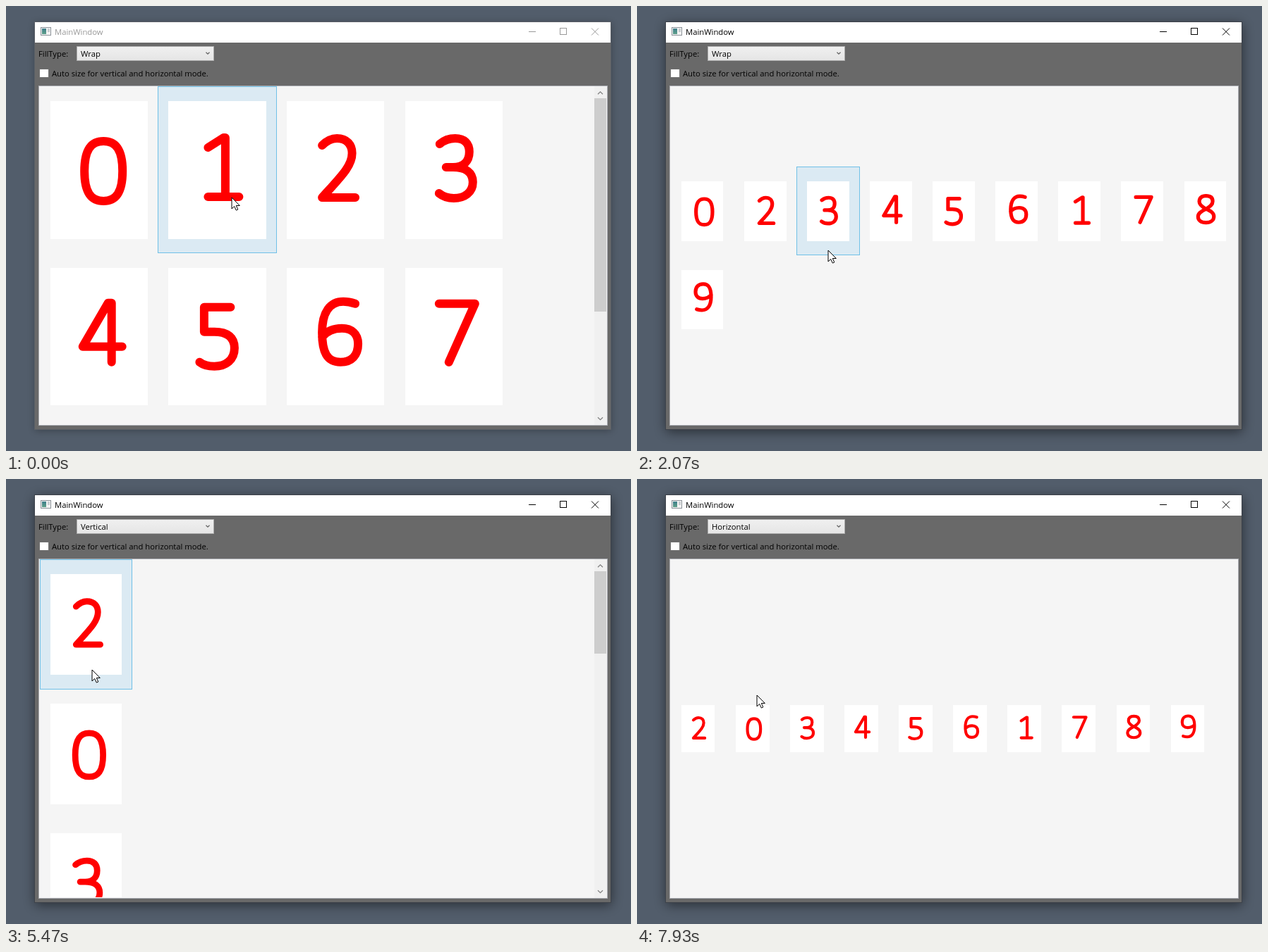
Animation of 886x632 px, one loop 8000 ms. Source, as an HTML page with a canvas:

```html
<!DOCTYPE html>
<html lang="en">
<head>
<meta charset="utf-8">
<title>Reorderable card list</title>
<style>
html, body { margin: 0; width: 100%; height: 100%; overflow: hidden; background: #525d6b; }
canvas { display: block; }
</style>
</head>
<body>
<canvas id="stage" width="886" height="632"></canvas>
<script>
const ctx = document.getElementById('stage').getContext('2d');
const LOOP = 8000, STEP = 200 / 3, FULL = 138.3;
const MODES = ['Horizontal', 'Vertical', 'Wrap'];

// Centre lines of the digits on a full-size card
const DIGITS = [
  'M75.5 57C94 57 102.5 70 102.5 99.5C102.5 129 94 142 75.5 142C57 142 48.5 129 48.5 99.5C48.5 70 57 57 75.5 57Z',
  'M56 66L78 52H80.5V136M56 136H100',
  'M50 63C58 55 66 53 71 53C85 53 92.5 62 92.5 74C92.5 92 78 106 50 137H97',
  'M49 61C57 54 65 53 71 53C84 53 91 60 91 72C91 86 82 94 68 94H58M68 94C86 94 96 102 96 115C96 130 84 138 69 138C60 138 53 135 48 131',
  'M87 134V50H82L46 112H102',
  'M88 56H50.5V91H65C84 91 93.5 99 93.5 114C93.5 131 81 140 65 140C56 140 49 138 44 134',
  'M97 51C91 49 86 48 80 48C62 48 50 62 50 92C50 120 57 134 76 134C92 134 101 124 101 108C101 94 92 86 78 86C66 86 56 91 50 98',
  'M48 51H99L62 134',
  'M72 90C55 81 50 75 50 66C50 54 58 47 72 47C87 47 94 54 94 65C94 76 86 82 72 90C54 99 46 105 46 115C46 128 56 135 72 135C88 135 98 127 98 115C98 104 90 98 72 90Z',
  'M51 129C57 131 62 132 68 132C86 132 98 118 98 88C98 60 91 46 72 46C56 46 47 56 47 72C47 86 56 94 70 94C82 94 92 89 98 82'
].map(d => new Path2D(d));
const ARROW = new Path2D('M.5 .5V16.5L4.2 13L6.8 18.6L9.3 17.5L6.8 12H11.8Z');

// [time, x, y]
const POINTER = [
  [0, 320, 272], [60, 320, 272], [200, 288, 254], [870, 462, 464], [930, 462, 464],
  [1070, 465, 470], [1270, 464, 466], [1600, 271, 357], [1870, 271, 357], [2000, 271, 347],
  [2270, 271, 347], [2400, 271, 357], [2530, 271, 357], [2730, 252, 96], [2800, 252, 96],
  [3000, 246, 74], [3130, 243, 72], [3270, 236, 73], [3600, 180, 108], [3730, 180, 108],
  [4470, 121, 425], [4730, 121, 425], [5200, 122, 268], [5400, 122, 268], [5470, 122, 271],
  [5940, 122, 271], [6270, 140, 146], [6600, 172, 70], [6800, 172, 70], [7130, 163, 117],
  [7200, 163, 117], [7470, 165, 92], [7670, 165, 92], [7930, 170, 307]
];
// [time, card width]
const ZOOM = [
  [0, FULL], [1270, FULL], [1730, 68], [2070, 59.7], [2270, 59.7], [2530, 101.1],
  [5470, 101.1], [6070, 47.7]
];
const DRAGS = [
  { item: 1, from: 200, to: 1200, grab: [58, 119], end: 6 },
  { item: 2, from: 4730, to: 5200, grab: [58, 106], end: 0 }
];
const POPUPS = [[3070, 3800], [6670, 7730]];

const linear = k => k;
const smooth = k => k * k * (3 - 2 * k);

function track(keys, t, ease) {
  let i = keys.findIndex(k => k[0] > t);
  if (i < 0) return keys[keys.length - 1].slice(1);
  i = Math.max(i, 1);
  const a = keys[i - 1], b = keys[i];
  const k = ease(Math.max(0, (t - a[0]) / (b[0] - a[0])));
  return a.slice(1).map((v, j) => v + (b[j + 1] - v) * k);
}

function layout(mode, w) {
  const h = w * Math.SQRT2, cw = w + 29.4, ch = h + 41.2;
  let cols = mode === 0 ? 10 : mode === 1 ? 1 : Math.min(10, Math.floor(805 / cw));
  const scroll = Math.ceil(10 / cols) * ch > 482;
  if (mode === 2 && scroll) cols = Math.min(cols, Math.floor(787 / cw));
  const total = Math.ceil(10 / cols) * ch;
  const top = scroll ? 114.4 : 354.4 - total / 2;
  return {
    w, h, cw, ch, scroll, total,
    cell: i => [48 + (i % cols) * cw, top + Math.floor(i / cols) * ch],
    slot(x, y) {
      const c = Math.floor((x - 48) / cw), r = Math.floor((y - top) / ch);
      const i = r * cols + c;
      return c < 0 || c >= cols || r < 0 || i > 9 || y < 114 || y > 594 ? -1 : i;
    }
  };
}

function rect(x, y, w, h, fill, line) {
  ctx.fillStyle = fill;
  ctx.fillRect(x, y, w, h);
  if (line) {
    ctx.strokeStyle = line;
    ctx.lineWidth = 1;
    ctx.strokeRect(x + .5, y + .5, w - 1, h - 1);
  }
}

function text(s, x, y, color = '#000') {
  ctx.fillStyle = color;
  ctx.font = '11.25px "Open Sans", "Noto Sans", sans-serif';
  ctx.fillText(s, x, y);
}

function line(points, color, width = 1) {
  ctx.beginPath();
  points.forEach(p => ctx.lineTo(...p));
  ctx.strokeStyle = color;
  ctx.lineWidth = width;
  ctx.stroke();
}

function chevron(x, y, r, dir, color) {
  line([[x - r, y - dir * r / 2], [x, y + dir * r / 2], [x + r, y - dir * r / 2]], color, 1.2);
}

function gradient(y, h, a, b) {
  const g = ctx.createLinearGradient(0, y, 0, y + h);
  g.addColorStop(0, a);
  g.addColorStop(1, b);
  return g;
}

function shadow(color, blur, dx, dy) {
  ctx.shadowColor = color;
  ctx.shadowBlur = blur;
  ctx.shadowOffsetX = dx;
  ctx.shadowOffsetY = dy;
}

function card(digit, x, y, w, h) {
  const l = Math.round(x), t = Math.round(y);
  rect(l, t, Math.round(x + w) - l, Math.round(y + h) - t, '#fff');
  ctx.save();
  ctx.translate(x, y);
  ctx.scale(w / FULL, w / FULL);
  ctx.lineWidth = 12;
  ctx.lineCap = ctx.lineJoin = 'round';
  ctx.strokeStyle = '#f00';
  ctx.stroke(DIGITS[digit]);
  ctx.restore();
}

function drawWindow(active) {
  rect(0, 0, 886, 632, '#525d6b');
  ctx.save();
  shadow(active ? 'rgba(0,0,0,.5)' : 'rgba(0,0,0,.3)', active ? 16 : 10, 0, active ? 4 : 2);
  rect(41, 22, 817, 579, '#696969');
  ctx.restore();
  rect(40, 22, 818, 580, '#696969', active ? '#3d424a' : '#5b6067');
  rect(41, 23, 816, 29, '#fff');

  rect(49, 30, 15, 12, '#f4f4f4', '#8b9299');
  rect(51, 32, 6, 8, gradient(32, 8, '#3f7f8c', '#5fa08a'));
  rect(59, 32, 3, 5, '#c9ced2');
  const ink = active ? '#000' : '#999';
  text('MainWindow', 69, 41, ink);
  line([[741, 36.5], [751, 36.5]], ink);
  ctx.strokeRect(785.5, 31.5, 9, 9);
  line([[830, 31.5], [840, 41.5]], ink);
  line([[840, 31.5], [830, 41.5]], ink);
}

function drawToolbar(mode, [x, y], open) {
  const overCombo = x > 100 && x < 295 && y > 57 && y < 78;
  const overCheck = !open && x > 47 && x < 287 && y > 87 && y < 105;
  text('FillType:', 46, 72);
  rect(100, 57, 195, 21,
    overCombo ? gradient(57, 21, '#ecf4fc', '#dcecfc') : gradient(57, 21, '#f0f0f0', '#e5e5e5'),
    overCombo ? '#7eb4ea' : '#acacac');
  text(MODES[mode], 106, 72);
  chevron(286, 67, 2.5, 1, overCombo ? '#000' : '#606060');
  rect(47, 89, 14, 13, overCheck ? '#f3f9ff' : '#fff', overCheck ? '#5593ff' : '#707070');
  text('Auto size for vertical and horizontal mode.', 65, 100);
}

function drawScrollbar(total) {
  rect(834, 114, 18, 481, '#f0f0f0');
  rect(834, 131, 17, Math.round(481 / total * 448), '#cdcdcd');
  chevron(842.5, 123.5, 3.5, -1, '#808080');
  chevron(842.5, 586, 3.5, 1, '#808080');
}

function drawList(lay, order, hover, drag, [px, py]) {
  rect(46, 113, 807, 483, '#f5f5f5', '#abadb3');
  ctx.save();
  ctx.beginPath();
  ctx.rect(47, 114, 805, 480);
  ctx.clip();
  order.forEach((digit, i) => {
    if (drag && digit === drag.item) return;
    const [x, y] = lay.cell(i);
    if (i === hover) {
      const l = Math.floor(x), t = Math.floor(y);
      rect(l, t, Math.ceil(x + lay.cw) - l, Math.round(y + lay.ch) - t, '#dbeaf3', '#70c0e7');
    }
    card(digit, x + 14.7, y + 20.6, lay.w, lay.h);
  });
  if (drag) card(drag.item, px - drag.grab[0], py - drag.grab[1], lay.w, lay.h);
  ctx.restore();
  if (lay.scroll) drawScrollbar(lay.total);
}

function drawPopup(k, mode, [x, y]) {
  const shown = Math.round(60 * k);
  if (!shown) return;
  const over = y > 79 && y < 138 && x > 100 && x < 295;
  const row = over ? Math.min(2, Math.floor((y - 79.5) / 19.5)) : mode;
  ctx.save();
  shadow('rgba(0,0,0,.55)', 4, 3, 3);
  rect(100, 79, 196, shown, '#fff');
  ctx.restore();
  ctx.save();
  ctx.beginPath();
  ctx.rect(100, 79, 196, shown);
  ctx.clip();
  ctx.translate(0, shown - 60);
  rect(100, 79, 196, 60, '#fff', '#646464');
  rect(101, Math.floor(80 + row * 19.4), 194, 19, '#d1e8f9', '#66a7d8');
  MODES.forEach((m, i) => text(m, 106, 94 + Math.round(i * 19.4)));
  ctx.restore();
}

function drawPointer([x, y]) {
  ctx.save();
  ctx.translate(Math.round(x) - .5, Math.round(y) - .5);
  ctx.fillStyle = '#fff';
  ctx.fill(ARROW);
  ctx.strokeStyle = '#000';
  ctx.lineWidth = 1;
  ctx.stroke(ARROW);
  ctx.restore();
}

function render(now) {
  const n = Math.floor((now % LOOP) / STEP + .05);
  const t = Math.round(n * STEP / 10) * 10;
  const pos = track(POINTER, t, smooth);
  const mode = t < 3800 ? 2 : t < 7730 ? 1 : 0;
  const lay = layout(mode, track(ZOOM, t, linear)[0]);
  const drag = DRAGS.find(d => t >= d.from && t < d.to);
  const popup = POPUPS.find(p => t >= p[0] && t < p[1]);

  const order = DIGITS.map((_, i) => i);
  for (const d of DRAGS) {
    if (t < d.from) continue;
    const from = order.indexOf(d.item);
    const slot = d === drag ? lay.slot(...pos) : d.end;
    order.splice(from, 1);
    order.splice(slot < 0 ? from : slot, 0, d.item);
  }
  // Hover highlighting trails the pointer by one step
  const hover = drag || popup ? -1 : lay.slot(...track(POINTER, Math.max(0, t - STEP), smooth));

  drawWindow(t >= 70);
  drawToolbar(mode, pos, popup);
  drawList(lay, order, hover, drag, pos);
  if (popup) drawPopup(Math.min(1, (t - popup[0]) / 220), mode, pos);
  drawPointer(pos);
}

const start = performance.now();
(function frame() {
  render(performance.now() - start);
  requestAnimationFrame(frame);
})();
</script>
</body>
</html>
```
